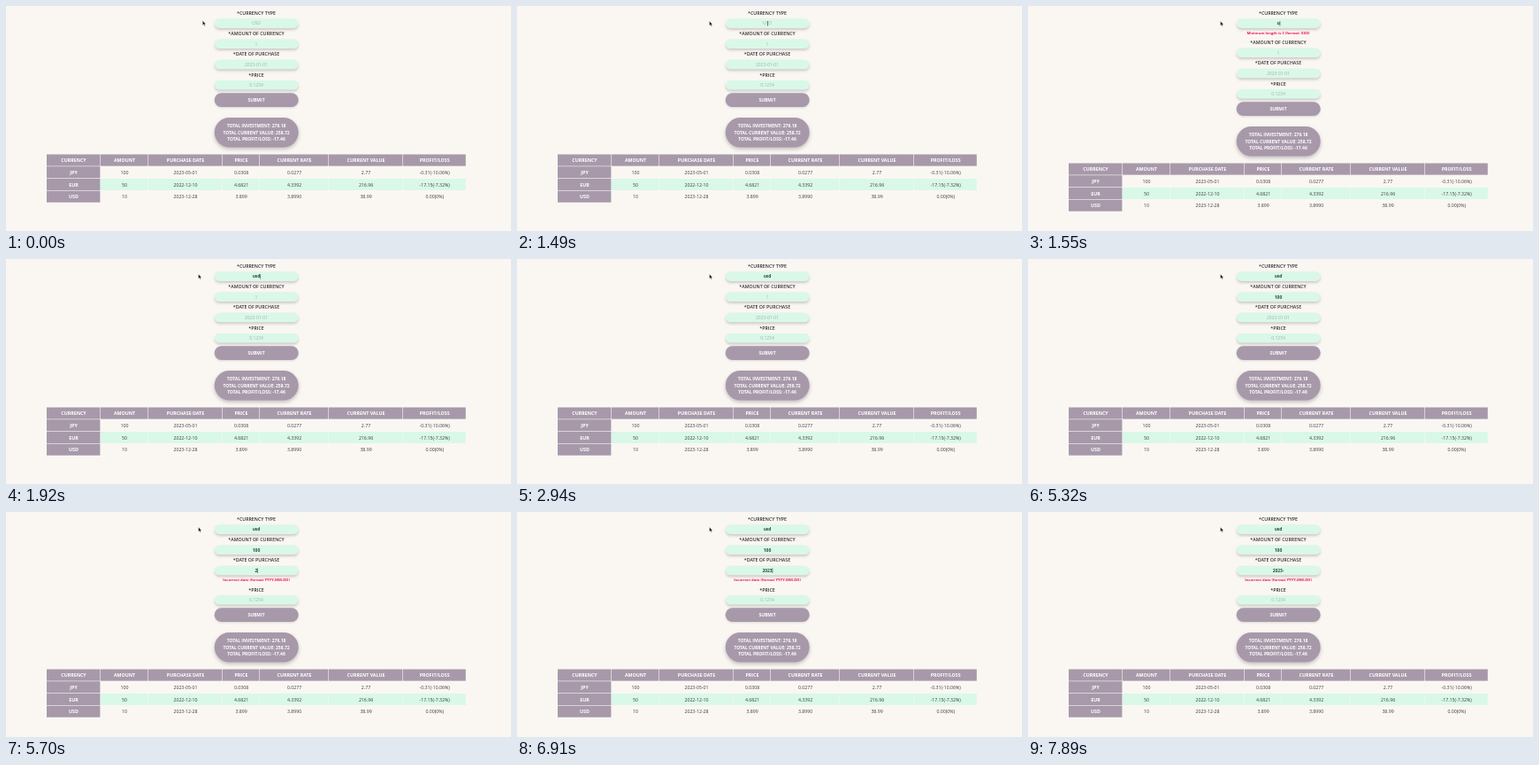
Recreate the animation shown at these times as an HTML page. Size 571x254 px, loop 8000 ms.

```html
<!DOCTYPE html>
<html lang="en">
<head>
<meta charset="utf-8">
<title>Currency form</title>
<style>
html, body { margin: 0; width: 100%; height: 100%; overflow: hidden; background: #faf7f2; }
svg { display: block; width: 571px; height: 254px; }
text { font: 500 5.2px "Open Sans", "Noto Sans", sans-serif; fill: #3e3a40; text-anchor: middle; }
.label { font-weight: 600; font-size: 5.25px; fill: #302d32; }
.value { font-weight: 700; font-size: 4.9px; fill: #34443d; }
.hint { font-weight: 400; font-size: 5px; fill: #9fb3a9; }
.error { font-weight: 700; font-size: 4.15px; fill: #ee1450; }
.head { font-weight: 700; font-size: 5.3px; fill: #fff; }
.sum { font-weight: 700; font-size: 4.98px; fill: #fff; }
.field { fill: #d9f8e8; filter: drop-shadow(0 2px 1.8px rgba(70, 60, 75, .24)); }
.mauve { fill: #a799aa; }
.raised { filter: drop-shadow(0 2px 2px rgba(70, 60, 75, .32)); }
.soft { filter: drop-shadow(0 1px 1px rgba(70, 60, 75, .18)); }
.caret { fill: #34443d; }
</style>
</head>
<body>
<svg id="stage" viewBox="0 0 571 254"></svg>
<script>
const LOOP = 8000, MID = 283;
const stage = document.getElementById('stage');

function add(parent, tag, attrs, text) {
  const el = document.createElementNS('http://www.w3.org/2000/svg', tag);
  for (const key in attrs) el.setAttribute(key, attrs[key]);
  if (text !== undefined) el.textContent = text;
  parent.appendChild(el);
  return el;
}
const rect = (parent, x, y, width, height, cls, rx = 0) =>
  add(parent, 'rect', { x, y, width, height, rx, class: cls });
const write = (parent, x, y, text, cls = '') => add(parent, 'text', { x, y, class: cls }, text);
const show = (el, on) => el.setAttribute('visibility', on ? 'visible' : 'hidden');

// typed: [time, text]; carets: [on, off]; error: shown intervals
const specs = [
  { label: '*CURRENCY TYPE', hint: 'USD',
    typed: [[1550, 'u'], [1740, 'us'], [1860, 'usd']],
    carets: [[720, 1100], [1430, 2360]],
    message: 'Minimum length is 3 (format: XXX)', error: [1550, 1860] },
  { label: '*AMOUNT OF CURRENCY', hint: '1',
    typed: [[3820, '1'], [4070, '10'], [4310, '100']],
    carets: [[2590, 2940], [3320, 3700], [3820, 4690]] },
  { label: '*DATE OF PURCHASE', hint: '2023-01-01',
    typed: [[5700, '2'], [6270, '20'], [6580, '202'], [6910, '2023'], [7230, '2023-']],
    carets: [[4940, 5320], [5700, 6080], [6270, 7630]],
    message: 'Incorrect date (format YYYY-MM-DD)', error: [5700, LOOP] },
  { label: '*PRICE', hint: '0.1234', typed: [], carets: [] }
];

const fields = specs.map((spec, i) => {
  const y = 8 + i * 23.2;
  const g = add(stage, 'g', {});
  write(g, MID, y + 2, spec.label, 'label');
  rect(g, 236, y + 6.3, 94.5, 10.6, 'field', 5.3);
  const text = write(g, MID, y + 13.4, spec.hint, 'hint');
  const caret = rect(g, MID, y + 9, .6, 5.6, 'caret');
  const error = spec.message && write(g, MID, y + 23.7, spec.message, 'error');
  return { ...spec, g, text, caret, errorText: error };
});

const lower = add(stage, 'g', {});
rect(lower, 235.7, 98.3, 95, 15.8, 'mauve soft', 7.9);
write(lower, MID, 108, 'SUBMIT', 'sum');
rect(lower, 235.7, 126, 95, 33.4, 'mauve raised', 16.7);
['TOTAL INVESTMENT: 276.18', 'TOTAL CURRENT VALUE: 258.72', 'TOTAL PROFIT/LOSS: -17.46']
  .forEach((line, i) => write(lower, MID, 136.7 + i * 7.8, line, 'sum'));

const edges = [46, 107, 161, 245, 287, 365, 449, 520.4];
const rows = [
  ['CURRENCY', 'AMOUNT', 'PURCHASE DATE', 'PRICE', 'CURRENT RATE', 'CURRENT VALUE', 'PROFIT/LOSS'],
  ['JPY', '100', '2023-05-01', '0.0308', '0.0277', '2.77', '-0.31(-10.06%)'],
  ['EUR', '50', '2022-12-10', '4.6821', '4.3392', '216.96', '-17.15(-7.32%)'],
  ['USD', '10', '2023-12-28', '3.899', '3.8990', '38.99', '0.00(0%)']
];
rows.forEach((row, r) => {
  const y = 167.5 + r * 13.7;
  row.forEach((cell, c) => {
    const x = edges[c], w = edges[c + 1] - x, head = !r || !c;
    if (head || r === 2) {
      const el = rect(lower, x, y, w - .6, 13.1, head ? 'mauve' : '');
      if (!head) el.setAttribute('fill', '#d9f8e8');
    }
    write(lower, x + w / 2, y + 8.7, cell, head ? 'head' : '');
  });
});

const pointer = add(stage, 'path', {
  d: 'M0 0V5.2L1.2 4.1L2.1 6L3 5.6L2.1 3.8H3.7Z',
  fill: '#111', stroke: '#fff', 'stroke-width': .4
});

const within = (t, [from, to]) => t >= from && t < to;

function draw(t) {
  let shift = 0;
  for (const f of fields) {
    f.g.setAttribute('transform', `translate(0 ${shift})`);
    const step = f.typed.filter(([at]) => t >= at).pop();
    const value = step ? step[1] : f.hint;
    if (f.text.textContent !== value) f.text.textContent = value;
    f.text.setAttribute('class', step ? 'value' : 'hint');
    const end = step ? f.text.getComputedTextLength() / 2 : 0;
    f.caret.setAttribute('x', MID + end);
    show(f.caret, f.carets.some(span => within(t, span)));
    if (f.errorText) {
      const bad = within(t, f.error);
      show(f.errorText, bad);
      if (bad) shift += 10;
    }
  }
  lower.setAttribute('transform', `translate(0 ${shift})`);
  const p = Math.min(1, Math.max(0, (t - 320) / 720));
  const ease = p * p * (3 - 2 * p);
  pointer.setAttribute('transform', `translate(${222.3 - 4.8 * ease} ${16.6 + .5 * ease})`);
}

const start = performance.now();
function tick() {
  draw((performance.now() - start) % LOOP);
  requestAnimationFrame(tick);
}
tick();
</script>
</body>
</html>
```
